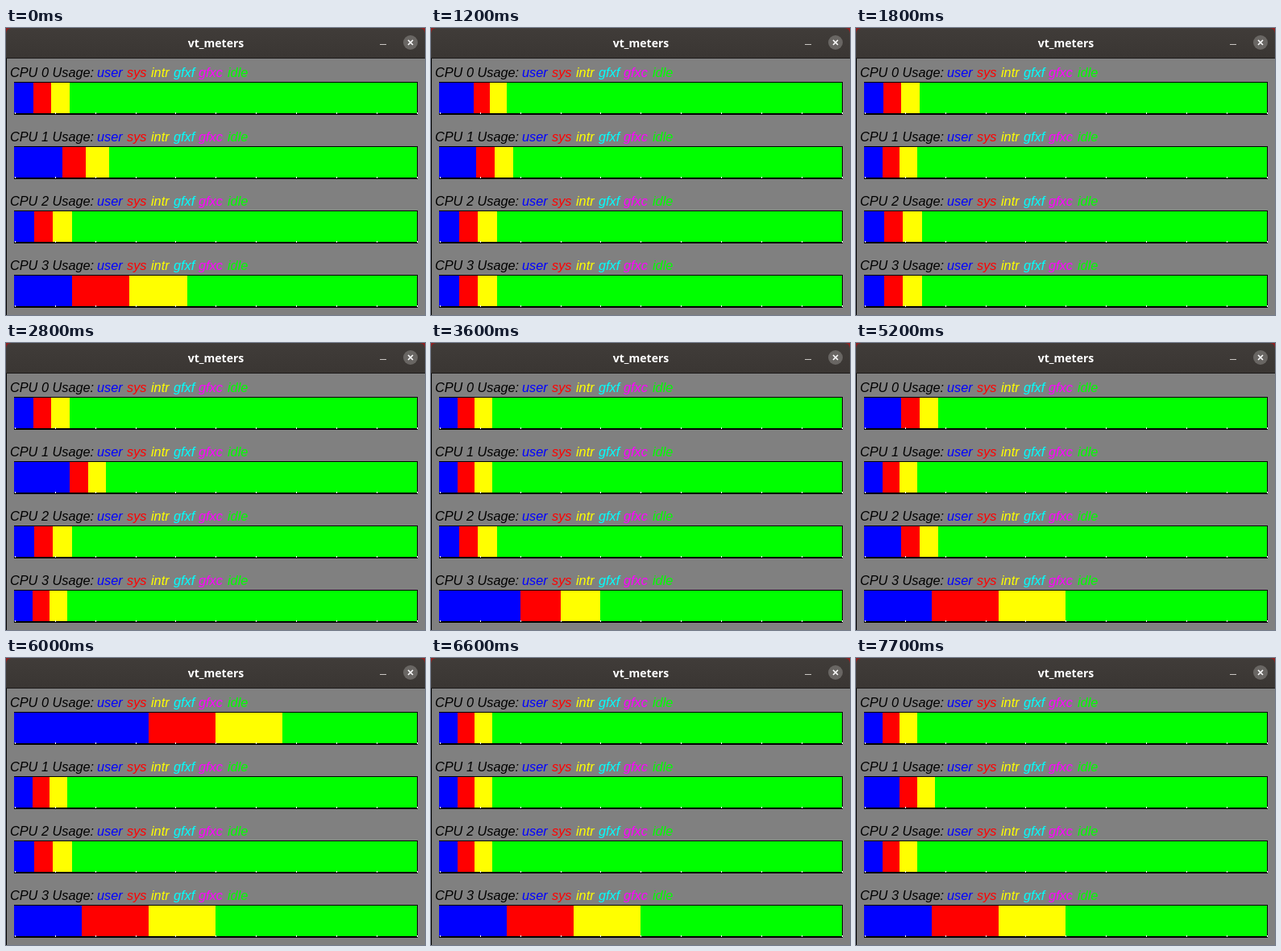
Animation, 520 px wide and 357 px high, one loop 8000 ms. Source, as an HTML page with a canvas:

```html
<!DOCTYPE html>
<html>
<head>
<meta charset="utf-8">
<style>
html, body { margin: 0; width: 520px; height: 357px; overflow: hidden; background: #808080; }
canvas { display: block; }
</style>
</head>
<body>
<canvas id="stage" width="520" height="357"></canvas>
<script>
const ctx = document.getElementById('stage').getContext('2d');
const LOOP = 8000, STEP = 200;
const LEFT = 11, WIDTH = 498.5;

// A resting CPU spends one tick each in user, sys and intr, out of `early` ticks
// until it settles at 23.
const resting = [
  { early: 22, settles: 3000 },
  { early: 23, settles: 0 },
  { early: 21, settles: 6400 },
  { early: 21, settles: 2600 }
];

// Bursts of work: [cpu, start, user ticks, total ticks, duration]
const bursts = [
  [0, 1200, 2, 24], [0, 5200, 2, 22], [0, 6000, 2, 6],
  [1, 0, 2, 17], [1, 200, 2, 22, 1200], [1, 2800, 3, 22], [1, 7100, 2, 23, 900],
  [2, 5200, 2, 22],
  [3, 0, 1, 7, 600], [3, 600, 2, 6], [3, 1400, 3, 6, 300],
  [3, 3600, 2, 10], [3, 4400, 1, 4], [3, 4800, 1, 6, 3200]
];

const legend = [
  ['user', 113, '#00f'], ['sys', 150, '#f00'], ['intr', 180, '#ff0'],
  ['gfxf', 208, '#0ff'], ['gfxc', 239, '#f0f'], ['idle', 275, '#0f0']
];

function loadAt(cpu, time) {
  const burst = bursts.find(([id, start, , , duration = STEP]) =>
    id === cpu && time >= start && time < start + duration);
  if (burst) return { user: burst[2], total: burst[3] };

  const { early, settles } = resting[cpu];
  const dip = Math.floor(time / STEP) % 8 === 5 ? 2 : 0;
  return { user: 1, total: (time < settles ? early : 23) + dip };
}

function rect(color, x, y, w, h) {
  ctx.fillStyle = color;
  ctx.fillRect(x, y, w, h);
}

function text(string, x, y, color) {
  ctx.fillStyle = color;
  ctx.fillText(string, x, y);
}

function drawTitleBar() {
  rect('#8e2020', 0, 0, 520, 12);
  const shade = ctx.createLinearGradient(0, 0, 0, 38);
  shade.addColorStop(0, '#403c39');
  shade.addColorStop(1, '#3a3633');
  ctx.fillStyle = shade;
  ctx.beginPath();
  ctx.roundRect(0, 0, 520, 38, [7, 7, 0, 0]);
  ctx.fill();
  rect('#1c1a19', 0, 37, 520, 1);

  ctx.font = 'bold 14px "Open Sans", sans-serif';
  ctx.textAlign = 'center';
  text('vt_meters', 260.5, 24, '#fff');

  rect('#c9c6c2', 464, 20, 8, 1);
  ctx.fillStyle = '#696663';
  ctx.beginPath();
  ctx.arc(502, 18, 9, 0, Math.PI * 2);
  ctx.fill();
  ctx.strokeStyle = '#fff';
  ctx.lineWidth = 1.6;
  ctx.beginPath();
  ctx.moveTo(499, 15);
  ctx.lineTo(505, 21);
  ctx.moveTo(505, 15);
  ctx.lineTo(499, 21);
  ctx.stroke();
}

function drawMeter(cpu, time) {
  const top = 68 + cpu * 80;
  const { user, total } = loadAt(cpu, time);
  const edge = share => Math.round(LEFT + WIDTH * share);

  ctx.font = 'italic 16.3px "Liberation Sans", Arial, sans-serif';
  ctx.textAlign = 'left';
  text(`CPU ${cpu} Usage:`, 5, top - 7, '#000');
  for (const [label, x, color] of legend) text(label, x, top - 7, color);

  const bar = (color, end) => rect(color, 10, top, end - 10, 38);
  rect('#000', 10, top - 1, 501, 41);
  bar('#0f0', 510);
  bar('#ff0', edge((user + 2) / total));
  bar('#f00', edge((user + 1) / total));
  bar('#00f', edge(user / total));
  for (let i = 0; i <= 10; i++) rect('#fff', edge(i / 10), top + 37, 1, 2);
}

function draw() {
  const time = performance.now() % LOOP;
  rect('#808080', 0, 0, 520, 357);
  drawTitleBar();
  rect('#000', 0, 38, 1, 319);
  for (let cpu = 0; cpu < 4; cpu++) drawMeter(cpu, time);
  requestAnimationFrame(draw);
}
draw();
</script>
</body>
</html>
```
